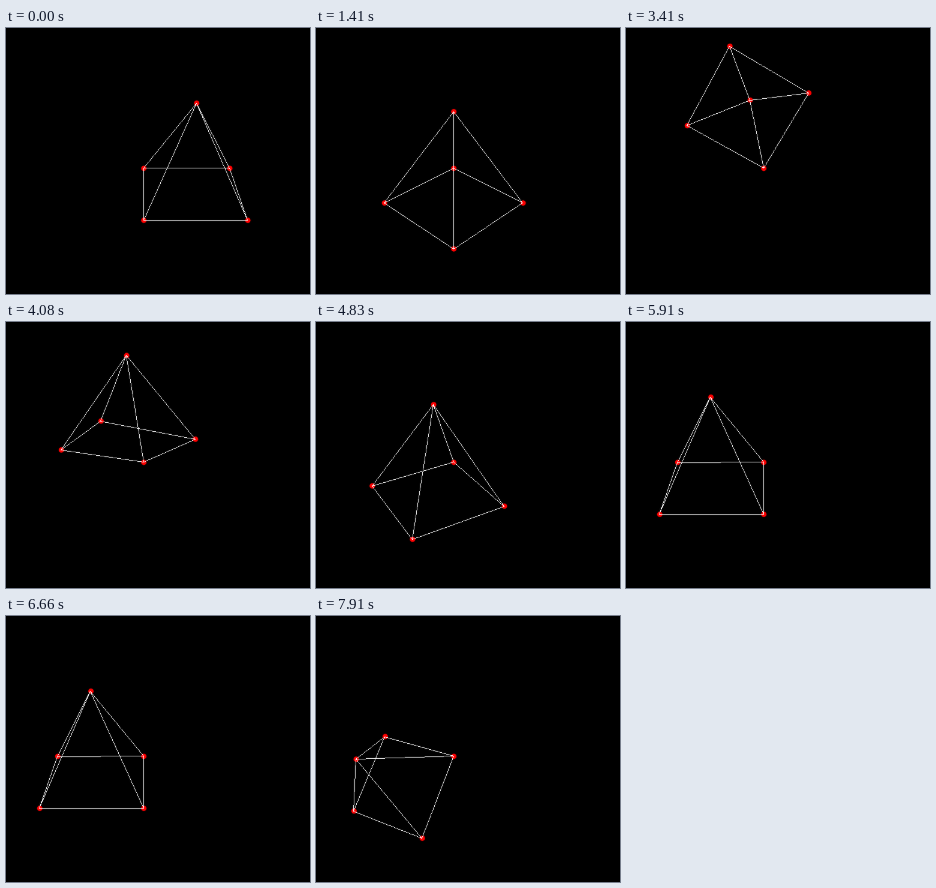
Animation of 304x266 px, one loop 8000 ms. Source, as an HTML page with a canvas:

```html
<!DOCTYPE html>
<html lang="en">
<head>
<meta charset="utf-8">
<title>Rotating pyramid</title>
<style>
  html, body { margin: 0; width: 100%; height: 100%; overflow: hidden; background: #000; }
  canvas { display: block; width: 304px; height: 266px; }
</style>
</head>
<body>
<canvas id="stage" width="304" height="266"></canvas>
<script>
const LOOP = 8000;
const FPS = 12;
const STEP = 15 * Math.PI / 180;
const DISTANCE = 5;

// The wireframe is drawn with hard pixels on a finer grid, then scaled down.
const GRID = 5 / 3;
const SIZE = 86 * GRID;
const PIVOT = { x: 229, y: 233 };

const stage = document.getElementById('stage').getContext('2d');
const fine = document.createElement('canvas');
fine.width = 507;
fine.height = 444;
const ctx = fine.getContext('2d');

// Unit pyramid, y pointing down: a square base, then the apex.
const CORNERS = [[0, 0, 0], [1, 0, 0], [1, 0, 1], [0, 0, 1], [0.5, -1, 0.5]];

// Key presses made by frame f: `count` of them from `start`, `every` frames apart.
function presses(f, start, every, count) {
  return Math.max(0, Math.min(count, Math.floor((f - start) / every) + 1));
}

function pose(f) {
  const yaw = presses(f, 6, 5, 2) + presses(f, 17, 2, 2) + presses(f, 65, 6, 2)
    + presses(f, 71.5, 0.3, 12) + presses(f, 75.5, 0.3, 12) // key held down
    + presses(f, 83, 2, 2);
  const tilt = 2 - presses(f, 23, 2.9, 7)
    + presses(f, 41.5, 2.35, 5) + presses(f, 55, 3, 2);
  const roll = presses(f, 88, 5, 2) + presses(f, 95, 1, 1);
  // The tiny extra tilt drops an edge-on base one row below the pivot.
  return { roll: roll * STEP, yaw: yaw * STEP, tilt: tilt * STEP + 1e-9 };
}

function turn(u, v, angle) {
  const c = Math.cos(angle), s = Math.sin(angle);
  return [u * c - v * s, u * s + v * c];
}

function project([x, y, z], { roll, yaw, tilt }) {
  [x, y] = turn(x, y, roll);
  [x, z] = turn(x, z, yaw);
  [z, y] = turn(z, y, tilt);
  const scale = SIZE * DISTANCE / (DISTANCE - z);
  return { x: x * scale, y: y * scale };
}

function snap(p) {
  return { x: PIVOT.x + Math.floor(p.x), y: PIVOT.y + Math.ceil(p.y) };
}

function line(a, b) {
  const dx = b.x - a.x, dy = b.y - a.y;
  const n = Math.max(Math.abs(dx), Math.abs(dy), 1);
  for (let i = 0; i <= n; i++) {
    ctx.fillRect(Math.round(a.x + dx * i / n), Math.round(a.y + dy * i / n), 1, 1);
  }
}

function dot(p) {
  ctx.beginPath();
  ctx.arc(PIVOT.x + 0.7 + p.x, PIVOT.y + 0.9 + p.y, 4.5, 0, Math.PI * 2);
  ctx.fill();
}

function draw(t) {
  const now = pose(Math.floor((t + 7) * FPS / 1000));
  const points = CORNERS.map(c => project(c, now));
  const ends = points.map(snap);

  ctx.fillStyle = '#000';
  ctx.fillRect(0, 0, fine.width, fine.height);
  ctx.fillStyle = '#f00';
  points.forEach(dot);
  ctx.fillStyle = '#fff';
  for (let i = 0; i < 4; i++) {
    line(ends[i], ends[(i + 1) % 4]);
    line(ends[i], ends[4]);
  }

  stage.imageSmoothingEnabled = true;
  stage.imageSmoothingQuality = 'high';
  stage.drawImage(fine, 0, 0, fine.width / GRID, fine.height / GRID);
}

const begin = performance.now();
function tick() {
  draw((performance.now() - begin) % LOOP);
  requestAnimationFrame(tick);
}
tick();
</script>
</body>
</html>
```
